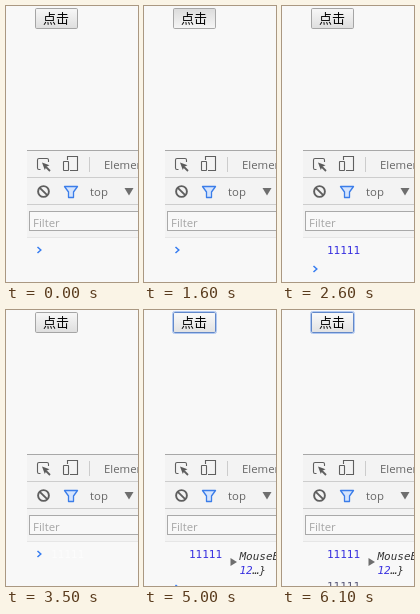
An HTML page that plays this animation: 132x276 px, repeating every 6800 ms.

```html
<!DOCTYPE html>
<html lang="zh">
<head>
<meta charset="utf-8">
<style>
  html, body { margin: 0; width: 100%; height: 100%; overflow: hidden; background: #f8f8f8; }
  svg { display: block; width: 132px; height: 276px; }
  .ui { font: 11.4px "Open Sans", "Noto Sans", sans-serif; fill: #666; }
  .mono { font: 11px "DejaVu Sans Mono", monospace; }
  .cjk { font: 13px "Noto Sans CJK SC", "Noto Sans CJK", sans-serif; }
  .blue { fill: #3a32e0; }
  .prompt { fill: none; stroke: #367cf1; stroke-width: 1.5; }
</style>
</head>
<body>
<svg viewBox="0 0 132 276">
  <defs>
    <linearGradient id="face" x1="0" y1="0" x2="0" y2="1">
      <stop id="faceTop" offset=".1"/>
      <stop id="faceEnd" offset="1"/>
    </linearGradient>
  </defs>
  <rect width="132" height="276" fill="#f8f8f8"/>

  <!-- page button -->
  <rect id="ring" x="28.5" y="1.5" width="44" height="22" rx="2" fill="none" stroke="#b0c8f2"/>
  <rect id="button" x="29.5" y="2.5" width="42" height="20" rx="1.2" fill="url(#face)"/>
  <text class="cjk" x="37" y="17">点击</text>

  <!-- developer tools -->
  <rect x="21" y="144" width="111" height="87" fill="#f3f3f3"/>
  <path d="M21 144.5H132" stroke="#a8a8a8"/>
  <path d="M21 171.5H132M21 198.5H132" stroke="#cdcdcd"/>
  <path d="M21 231.5H132" stroke="#e6e6e6"/>

  <g fill="none" stroke="#5f5f5f" stroke-width="1.1">
    <path d="M34.5 163.5H33Q31.5 163.5 31.5 162V154Q31.5 152.5 33 152.5H41Q42.5 152.5 42.5 154V156"/>
    <path d="M40 161L44 165" stroke-width="1.8"/>
    <path d="M61.5 154V150.5H71.5V164.5H64"/>
    <rect x="57.5" y="155.5" width="5" height="9" rx=".5"/>
    <circle cx="37.5" cy="185.5" r="5.4" stroke-width="1.9"/>
    <path d="M33.8 181.8L41.2 189.2" stroke-width="1.9"/>
  </g>
  <path d="M36 156.5L43.5 159.2L40.4 160.8L38.8 164Z" fill="#5a5a5a"/>
  <path d="M83.5 151V166" stroke="#cccccc"/>
  <text class="ui" x="98" y="163">Elements</text>

  <path d="M58.5 180.5H71.5L67.5 186V191.5H62.5V186Z" fill="#d5e4fd" stroke="#3b7de9" stroke-width="1.3" stroke-linejoin="round"/>
  <text class="ui" x="84" y="190">top</text>
  <path d="M118.5 182H127.5L123 189.5Z" fill="#6e6e6e"/>

  <rect x="23.5" y="205.5" width="120" height="19" fill="#f8f8f8" stroke="#a9a9a9"/>
  <text class="ui" x="27" y="221" style="fill:#a5a5a5">Filter</text>

  <!-- console -->
  <path id="prompt" class="prompt" d="M31.5 -3L34.8 0L31.5 3"/>
  <text id="count" class="mono" x="45" y="248">11111</text>
  <g id="event" class="mono">
    <path d="M86.5 248V256L93 252Z" fill="#6e6e6e"/>
    <g font-style="italic" fill="#333">
      <text x="95.5" y="250">MouseEvent</text>
      <text x="95.5" y="264"><tspan class="blue">12</tspan>…}</text>
    </g>
  </g>
  <text id="nextCount" class="mono" x="45" y="280" fill="#5a5a78">11111</text>
</svg>
<script>
const LOOP = 6800;
const byId = id => document.getElementById(id);

const looks = {
  normal:  { top: "#f5f5f5", end: "#dedede", edge: "#a5a5a5" },
  hover:   { top: "#f8f8f8", end: "#e2e2e2", edge: "#8c8c8c" },
  pressed: { top: "#dedede", end: "#f6f6f6", edge: "#a8a8a8" }
};

// The pointer enters, clicks several times and leaves, then returns.
const buttonSteps = [
  [0, "normal"], [400, "hover"],
  [1200, "pressed"], [1300, "hover"],
  [1600, "pressed"], [1700, "hover"],
  [2000, "pressed"], [2100, "hover"],
  [2400, "normal"], [3900, "hover"],
  [4200, "pressed"], [4300, "hover"],
  [4500, "pressed"], [4600, "hover"],
  [4800, "pressed"], [5000, "hover"],
  [5300, "pressed"], [5400, "hover"],
  [5500, "pressed"], [5700, "hover"],
  [6000, "pressed"], [6100, "hover"]
];

// Console stages: what is logged and where the prompt sits.
const consoleSteps = [
  [0, { promptY: 244 }],
  [2600, { promptY: 263, count: "#3a32e0" }],
  [3500, { promptY: 244, count: "#fcfcfc" }],
  [4800, { promptY: 278, count: "#3a32e0", event: true }],
  [5400, { promptY: 310, count: "#3a32e0", event: true, next: true }]
];

const at = (steps, t) => steps.findLast(([start]) => start <= t)[1];
const show = (id, on) => byId(id).setAttribute("visibility", on ? "visible" : "hidden");

function draw(t) {
  const look = looks[at(buttonSteps, t)];
  const focused = t >= 4200;
  byId("faceTop").setAttribute("stop-color", look.top);
  byId("faceEnd").setAttribute("stop-color", look.end);
  byId("button").setAttribute("stroke", focused ? "#6288c9" : look.edge);
  show("ring", focused);

  const log = at(consoleSteps, t);
  byId("prompt").setAttribute("transform", `translate(0 ${log.promptY})`);
  byId("count").setAttribute("fill", log.count || "none");
  show("event", log.event);
  show("nextCount", log.next);
}

const begin = performance.now();
function tick() {
  draw((performance.now() - begin) % LOOP);
  requestAnimationFrame(tick);
}
tick();
</script>
</body>
</html>
```
